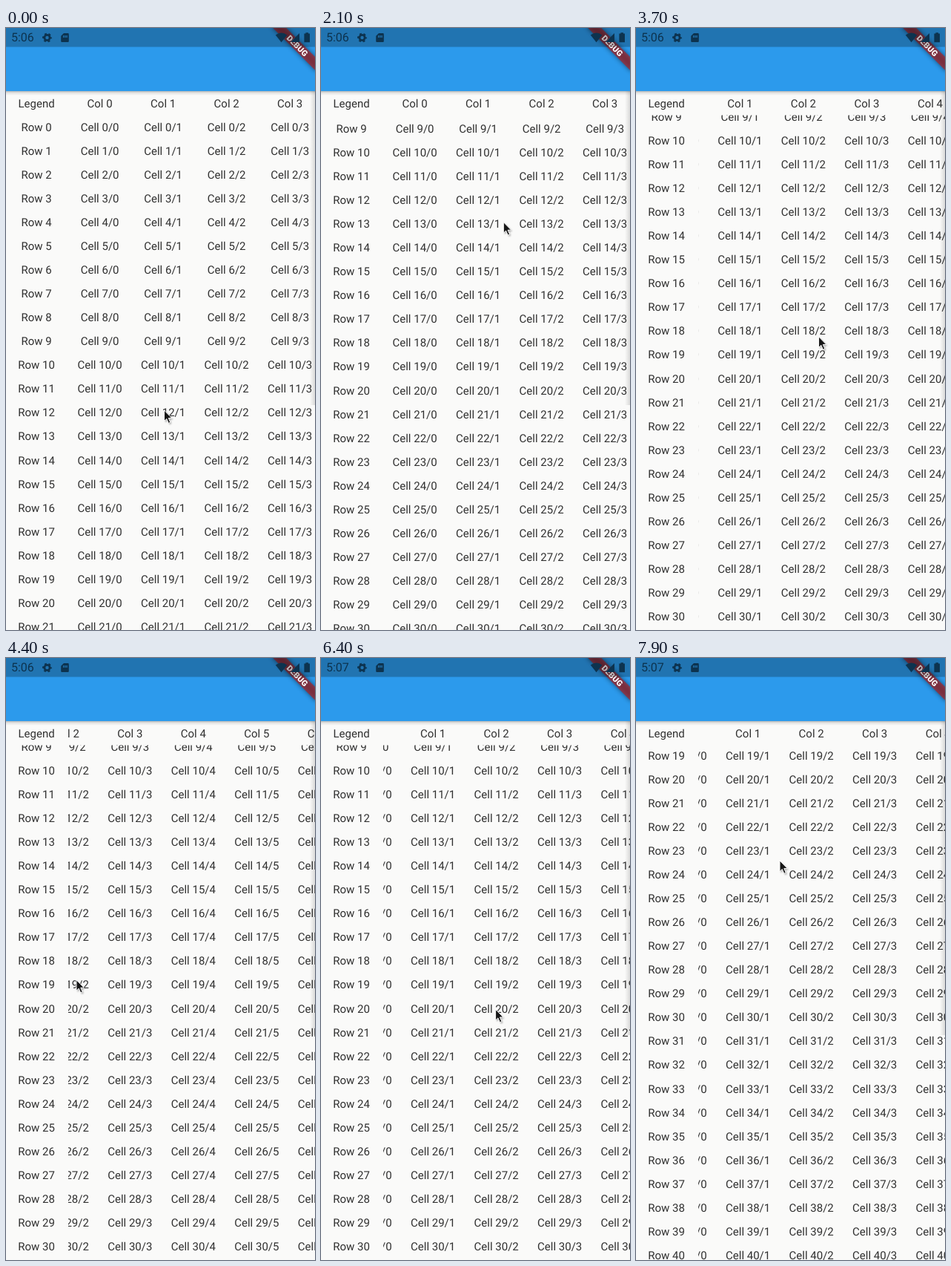
Animation of 417 by 811 pixels, one loop 8000 ms. Source, as an HTML page:

```html
<!DOCTYPE html>
<html lang="en">
<head>
<meta charset="utf-8">
<title>Scrolling table</title>
<style>
html, body { margin: 0; width: 417px; height: 811px; overflow: hidden; background: #fafaf9; }
svg { display: block; }
text { font-family: Roboto, sans-serif; text-anchor: middle; text-rendering: geometricPrecision; }
.table text { font-size: 15px; fill: #303030; }
.status { fill: #0d334f; }
#clock { font-size: 16px; text-anchor: start; }
.debug { font-size: 10.9px; font-weight: 900; fill: #fff; }
</style>
</head>
<body>
<svg width="417" height="811" viewBox="0 0 417 811">
  <defs>
    <clipPath id="headClip"><rect x="84" y="85" width="333" height="32.4"/></clipPath>
    <clipPath id="sideClip"><rect y="117.4" width="84" height="694"/></clipPath>
    <clipPath id="bodyClip"><rect x="84" y="117.4" width="333" height="694"/></clipPath>
    <linearGradient id="barShade" x2="0" y2="1">
      <stop stop-color="#000" stop-opacity=".27"/>
      <stop offset=".4" stop-color="#000" stop-opacity=".09"/>
      <stop offset="1" stop-color="#000" stop-opacity="0"/>
    </linearGradient>
    <linearGradient id="edgeShade">
      <stop stop-color="#000" stop-opacity="0"/>
      <stop offset="1" stop-color="#000" stop-opacity=".13"/>
    </linearGradient>
    <filter id="soft" x="-30%" y="-100%" width="160%" height="300%"><feGaussianBlur stdDeviation="3"/></filter>
    <filter id="tiny" x="-50%" y="-50%" width="200%" height="200%"><feGaussianBlur stdDeviation="1"/></filter>
    <path id="arrow" d="M0 0V14.6L3.3 11.5 5.8 17.4 8.3 16.3 5.8 10.6H10.4Z"/>
  </defs>

  <g class="table">
    <g id="corner"></g>
    <g clip-path="url(#headClip)"><g id="head"></g></g>
    <g clip-path="url(#sideClip)"><g id="side"></g></g>
    <g clip-path="url(#bodyClip)"><g id="cells"></g></g>
  </g>

  <rect y="85" width="417" height="6" fill="url(#barShade)"/>
  <rect x="410" y="85" width="7" height="423" fill="url(#edgeShade)"/>
  <rect width="417" height="85" fill="#2c9aec"/>

  <g transform="translate(418.8 -1.8) rotate(45)">
    <rect x="-42.8" y="29.9" width="85.6" height="12.8" opacity=".5" filter="url(#soft)"/>
    <rect x="-42.8" y="29.9" width="85.6" height="12.8" fill="#b71c1c" fill-opacity=".63"/>
    <text class="debug" y="40.2">DEBUG</text>
  </g>

  <rect width="417" height="25.5" opacity=".25"/>
  <g class="status">
    <text id="clock" x="7" y="18.4"></text>
    <g fill="none" stroke="#0d334f">
      <circle cx="55.5" cy="13" r="3.6" stroke-width="2.8"/>
      <circle cx="55.5" cy="13" r="5.4" stroke-width="2" stroke-dasharray="2.83 2.825" stroke-dashoffset="1.4"/>
    </g>
    <path fill-rule="evenodd" d="M78 7H83.6Q84.8 7 84.8 8.2V17.8Q84.8 19 83.6 19H75.4Q74.2 19 74.2 17.8V10.8ZM77 10V13H78.3V10ZM79.2 10V13H80.5V10ZM81.4 10V13H82.7V10Z"/>
    <path d="M371.6 19.2L363.8 9.6Q371.6 3.6 379.4 9.6Z"/>
    <path d="M396 19V7L384 19Z"/>
    <path d="M402.4 7.6H404.4V6.2H408V7.6H410V19.2H402.4Z"/>
  </g>

  <g id="cursor">
    <use href="#arrow" x="1.5" y="1.8" opacity=".35" filter="url(#tiny)"/>
    <use href="#arrow" fill="#161616" stroke="#fff"/>
  </g>
</svg>

<script>
const LOOP = 8000, TICK = 100;
const ROW = 32.07, COL = 85.52, LEFT = 41.1, TOP = 106.5;
const ROWS = 43, COLS = 7;
const $ = id => document.getElementById(id);

function label(parent, col, row, str) {
  const el = document.createElementNS('http://www.w3.org/2000/svg', 'text');
  el.setAttribute('x', LEFT + col * COL);
  el.setAttribute('y', TOP + row * ROW);
  el.textContent = str;
  $(parent).append(el);
}

label('corner', 0, 0, 'Legend');
for (let c = 0; c < COLS; c++) label('head', c + 1, 0, `Col ${c}`);
for (let r = 0; r < ROWS; r++) {
  label('side', 0, r + 1, `Row ${r}`);
  for (let c = 0; c < COLS; c++) label('cells', c + 1, r + 1, `Cell ${r}/${c}`);
}

// Eased progress from 0 to 1 between two times.
function ease(t, from, to) {
  const u = Math.min(1, Math.max(0, (t - from) / (to - from)));
  return u * u * (3 - 2 * u);
}

const scrollX = t => 251 * ease(t, 3100, 4800) - 190 * ease(t, 5235, 6200);
const scrollY = t => 302.4 * ease(t, 863, 2300) + 308.9 * ease(t, 6600, 7707);

// Pointer strokes: start, end, and the point reached.
const strokes = [
  { from: 0, to: 400, x: 223, y: 561 },
  { from: 500, to: 700, x: 234, y: 614 },
  { from: 863, to: 2300, x: 247, y: 242 },
  { from: 2400, to: 2900, x: 322, y: 407 },
  { from: 3100, to: 4800, x: 58, y: 438 },
  { from: 5235, to: 6200, x: 242, y: 454 },
  { from: 6300, to: 6700, x: 201, y: 578 },
  { from: 6700, to: 7600, x: 194, y: 273 },
];

function pointer(t) {
  let x = 213.5, y = 515;
  for (const s of strokes) {
    const k = ease(t, s.from, s.to);
    x += (s.x - x) * k;
    y += (s.y - y) * k;
  }
  return [x, y];
}

const move = (id, x, y) => $(id).setAttribute('transform', `translate(${x} ${y})`);

function draw() {
  const t = Math.floor(performance.now() % LOOP / TICK) * TICK;
  const x = -scrollX(t), y = -scrollY(t);
  move('head', x, 0);
  move('side', 0, y);
  move('cells', x, y);
  move('cursor', ...pointer(t));
  $('clock').textContent = t < 5000 ? '5:06' : '5:07';
  requestAnimationFrame(draw);
}
draw();
</script>
</body>
</html>
```
